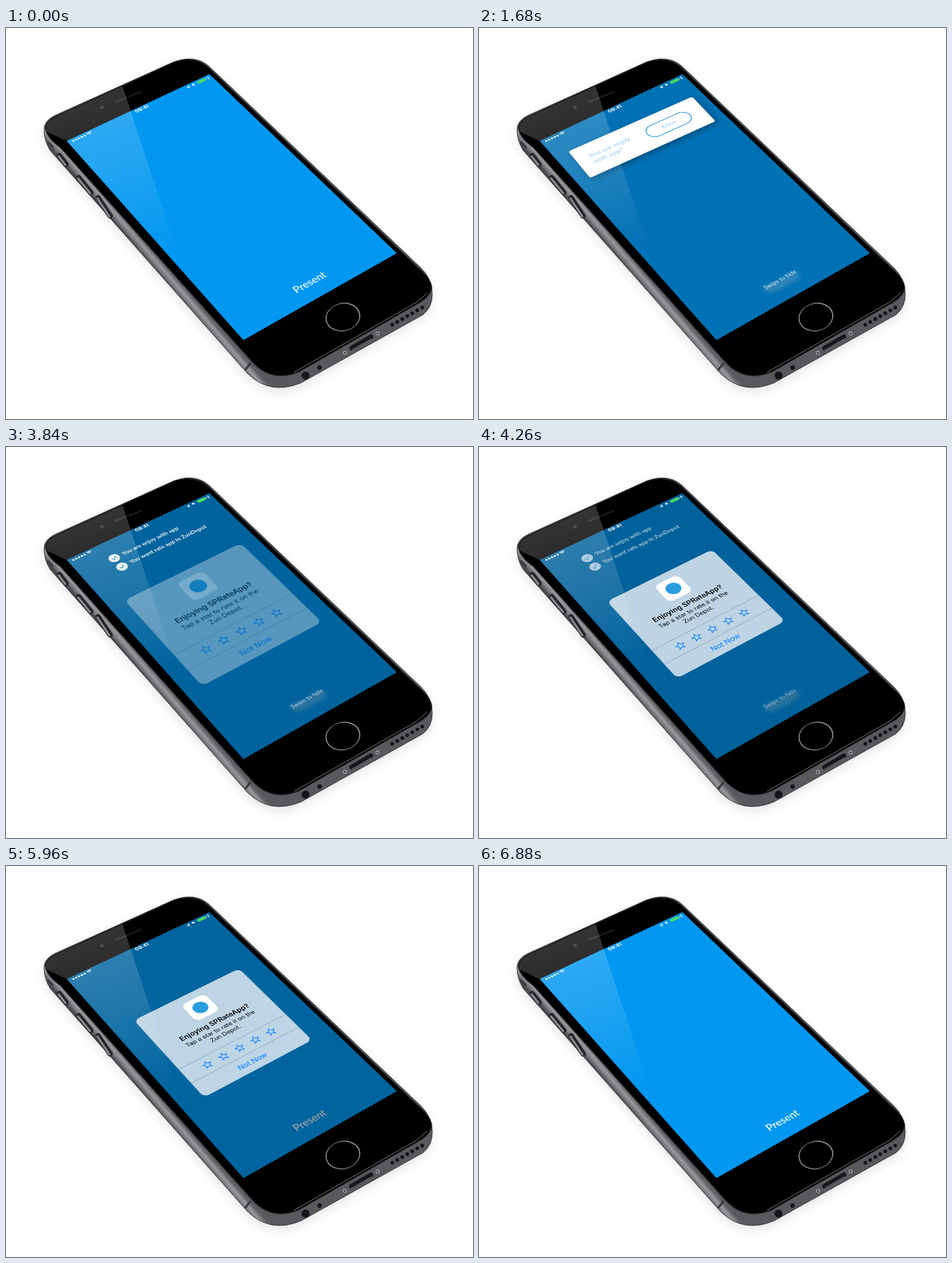
Animation of 700 by 585 pixels, one loop 6900 ms. Source, as an HTML page with a canvas:

```html
<!DOCTYPE html>
<html lang="en">
<head>
<meta charset="utf-8">
<title>Rate dialog</title>
<style>
  html, body { margin: 0; width: 100%; height: 100%; overflow: hidden; background: #fff; }
  canvas { position: absolute; left: 0; top: 0; display: block; }
  #screen { transform-origin: 0 0; }
</style>
</head>
<body>
<canvas id="phone" width="700" height="585"></canvas>
<canvas id="screen" width="375" height="667"></canvas>
<canvas id="glare" width="700" height="585"></canvas>
<script>
const LOOP = 6900, W = 375, H = 667, CX = W / 2;
const TEXT = 'Lato, sans-serif', SYSTEM = 'Inter, sans-serif';
const BLUE = '#1690dc', SKY = '#0097f1';
const context = id => document.getElementById(id).getContext('2d');
const body = context('phone'), screen2d = context('screen'), gloss = context('glare');
let ctx = screen2d;

// ---- timing ----
const clamp = x => Math.min(1, Math.max(0, x));
const smooth = x => x * x * (3 - 2 * x);
const ease = (t, from, to) => smooth(clamp((t - from) / (to - from)));
const easeOut = (t, from, to) => 1 - Math.pow(1 - clamp((t - from) / (to - from)), 3);
const mix = (a, b, k) => a + (b - a) * k;
const pulse = (t, inA, inB, outA, outB) => ease(t, inA, inB) * (1 - ease(t, outA, outB));

function track(t, keys) {
  let value = keys[0][1];
  for (let i = 1; i < keys.length; i++) {
    value = mix(value, keys[i][1], ease(t, keys[i - 1][0], keys[i][0]));
  }
  return value;
}

// ---- drawing helpers ----
function label(str, x, y, size, weight, color, align = 'center', family = TEXT) {
  ctx.font = `${weight} ${size}px ${family}`;
  ctx.textAlign = align;
  ctx.textBaseline = 'middle';
  ctx.fillStyle = color;
  ctx.fillText(str, x, y);
}

function box(x, y, w, h, r) {
  ctx.beginPath();
  ctx.roundRect(x, y, w, h, r);
}

function disc(c, x, y, r, color) {
  c.fillStyle = color;
  c.beginPath();
  c.arc(x, y, r, 0, Math.PI * 2);
  c.fill();
}

function line(c, color, width, ...points) {
  c.strokeStyle = color;
  c.lineWidth = width;
  c.beginPath();
  points.forEach(([x, y]) => c.lineTo(x, y));
  c.stroke();
}

function gradient(c, x0, y0, x1, y1, ...stops) {
  const fill = c.createLinearGradient(x0, y0, x1, y1);
  stops.forEach(([at, color]) => fill.addColorStop(at, color));
  return fill;
}

function layer(alpha, draw) {
  if (alpha <= 0.002) return;
  ctx.save();
  ctx.globalAlpha = alpha;
  draw();
  ctx.restore();
}

// Maps the flat screen onto its four corners on the stage.
function placeScreen([x0, y0], [x1, y1], [x2, y2], [x3, y3]) {
  const ax = x1 - x2, bx = x3 - x2, sx = x0 - x1 + x2 - x3;
  const ay = y1 - y2, by = y3 - y2, sy = y0 - y1 + y2 - y3;
  const det = ax * by - bx * ay;
  const g = (sx * by - bx * sy) / det, h = (ax * sy - sx * ay) / det;
  const m = [
    (x1 - x0 + g * x1) / W, (y1 - y0 + g * y1) / W, 0, g / W,
    (x3 - x0 + h * x3) / H, (y3 - y0 + h * y3) / H, 0, h / H,
    0, 0, 1, 0, x0, y0, 0, 1
  ];
  screen2d.canvas.style.transform = `matrix3d(${m.map(n => n.toFixed(9)).join()})`;
}

// ---- phone ----
const OUTLINE = new Path2D('M57 152Q57 139 73 131L251 51Q283 39 304 57L621 358Q639 375 639 398Q639 418 625 429L442 531Q396 550 362 517L66 183Q57 168 57 152Z');
const FACE = new Path2D('M60 150Q61 139 77 132L252 52Q282 42 302 59L618 360Q637 377 637 388Q636 401 618 411L440 513Q398 531 369 498L82 178Q62 164 60 150Z');

function drawPhone() {
  const c = body;
  c.fillStyle = '#fff';
  c.fillRect(0, 0, 700, 585);

  c.save();
  c.shadowColor = 'rgba(0,0,0,.1)';
  c.shadowBlur = 16;
  c.shadowOffsetY = 6;
  c.fillStyle = gradient(c, 214, 350, 228, 338,
    [0, '#48494c'], [.25, '#77787b'], [.5, '#98999c'], [.8, '#626366'], [1, '#58595c']);
  c.fill(OUTLINE);
  c.restore();

  c.strokeStyle = '#353639';
  c.lineWidth = 1;
  c.stroke(OUTLINE);
  c.strokeStyle = '#1b1c1e';
  c.lineWidth = 3;
  c.stroke(FACE);
  c.fillStyle = '#000';
  c.fill(FACE);

  c.lineCap = 'round';
  line(c, '#77787b', 1, [432, 515], [616, 410], [632, 396]);
  for (const [x1, y1, x2, y2] of [[80, 191, 90, 204], [109, 224, 127, 246], [138, 254, 156, 281]]) {
    line(c, '#252629', 8, [x1, y1], [x2, y2]);
    line(c, '#8b8c8f', 3, [x1 - 1, y1 + 1], [x2 - 1, y2 + 1]);
  }
  line(c, '#36373a', 3, [366, 502], [359, 511]);
  line(c, '#37383b', 3, [63, 171], [70, 178]);

  line(c, '#161719', 7, [518, 479], [547, 462]);
  line(c, '#77787b', 1, [518, 482], [548, 465]);
  disc(c, 449, 520, 6, '#151619');
  disc(c, 470, 508, 3.4, '#151619');
  for (const [x, y] of [[508, 486], [557, 457]]) {
    disc(c, x, y, 3, '#a0a1a4');
    disc(c, x, y, 1.6, '#38393c');
  }
  for (let i = 0; i < 7; i++) disc(c, 579 + i * 7.5, 444 - i * 4.3, 2.8, '#131417');

  line(c, '#2f3032', 2.6, [165, 110], [202, 95]);
  line(c, '#090909', 1.6, [165, 109.5], [202, 94.5]);
  disc(c, 144, 119, 2.6, '#25262a');

  c.strokeStyle = gradient(c, 482, 450, 526, 414, [0, '#98989a'], [.5, '#454548'], [1, '#a5a5a7']);
  c.lineWidth = 1.7;
  c.beginPath();
  c.ellipse(505, 432.5, 25.5, 20.5, -.22, 0, Math.PI * 2);
  c.stroke();
}

function drawGlare() {
  const c = gloss;
  c.save();
  c.clip(FACE);
  c.fillStyle = gradient(c, 155, 105, 235, 340,
    [0, 'rgba(255,255,255,.2)'], [.45, 'rgba(255,255,255,.12)'], [1, 'rgba(255,255,255,0)']);
  c.beginPath();
  [[174, 85], [258, 340], [250, 346], [91, 169], [50, 150], [50, 120]].forEach(p => c.lineTo(...p));
  c.fill();
  c.restore();
}

// ---- app screen ----
function wallpaper() {
  ctx.fillStyle = SKY;
  ctx.fillRect(0, 0, W, H);
  const step = 30, reach = H * .577;
  const faint = 'rgba(255,255,255,.035)';
  for (let x = -reach; x < W + reach; x += step) {
    line(ctx, faint, 1, [x, 0], [x + reach, H]);
    line(ctx, faint, 1, [x, 0], [x - reach, H]);
  }
  for (let y = 0; y < H; y += step * .866) line(ctx, faint, 1, [0, y], [W, y]);
}

function statusBar() {
  const y = 8.5;
  for (let i = 0; i < 5; i++) disc(ctx, 12 + i * 7, y, 2.5, '#fff');
  ctx.lineCap = 'butt';
  for (const r of [2, 5, 8]) {
    ctx.strokeStyle = '#fff';
    ctx.lineWidth = 1.8;
    ctx.beginPath();
    ctx.arc(52, y + 4, r, -Math.PI * .75, -Math.PI * .25);
    ctx.stroke();
  }
  label('09:41', CX, y + .5, 12.5, 700, '#fff', 'center', SYSTEM);
  ctx.fillStyle = '#fff';
  ctx.beginPath();
  [[306, 10], [316, 4], [312, 15], [311, 10]].forEach(p => ctx.lineTo(...p));
  ctx.fill();
  disc(ctx, 325, y, 3, '#fff');
  ctx.fillStyle = '#4cd964';
  box(336, 4.5, 22, 9, 2);
  ctx.fill();
  ctx.fillStyle = '#fff';
  ctx.fillRect(359, 7, 1.5, 4);
  line(ctx, '#fff', 1.6, [367, 4], [364, 9], [367, 9], [364, 14]);
}

// The button behind the dialog stays in place and melts into its blur.
function presentButton(t) {
  const blur = 7 * pulse(t, 20, 1100, 4200, 4980);
  ctx.save();
  if (blur > .1) ctx.filter = `blur(${blur}px)`;
  label('Present', CX, 627, 22.5, 500, '#fff');
  ctx.restore();
}

function cardText(lines, action, alpha) {
  layer(ctx.globalAlpha * alpha, () => {
    lines.forEach((str, i) => label(str, -129, -9 + i * 20, 17, 700, BLUE, 'left'));
    label(action, 67, 0, 14.5, 700, BLUE);
  });
}

function card(t) {
  const alpha = pulse(t, 120, 480, 3300, 3650);
  layer(alpha, () => {
    const moved = ease(t, 1620, 2120);
    const y = mix(-70, 117, easeOut(t, 100, 700)) + 25 * moved;
    const size = 1 - .08 * ease(t, 3300, 3650);
    ctx.translate(190, y);
    ctx.rotate(.037);
    ctx.scale(size, size);
    ctx.save();
    ctx.shadowColor = 'rgba(0,0,0,.32)';
    ctx.shadowBlur = 18;
    ctx.shadowOffsetX = 3;
    ctx.shadowOffsetY = 8;
    ctx.fillStyle = '#fff';
    box(-158, -48, 316, 96, 5);
    ctx.fill();
    ctx.restore();
    ctx.strokeStyle = '#2c97d6';
    ctx.lineWidth = 2;
    box(12, -19.5, 110, 39, 19.5);
    ctx.stroke();
    cardText(['You are enjoy', 'with app?'], 'Enjoy', 1 - ease(t, 1540, 1780));
    cardText(['Rate App in', 'ZunDepot?'], 'Rate', ease(t, 1760, 2050));
  });
}

function doneRow(str, y, alpha) {
  layer(alpha, () => {
    disc(ctx, 87, y, 12.5, '#fff');
    line(ctx, '#0872b4', 2, [81.5, y], [85.5, y + 4], [92.5, y - 4]);
    label(str, 108, y, 14.3, 700, '#fff', 'left');
  });
}

function star(x, y, r) {
  ctx.beginPath();
  for (let i = 0; i < 10; i++) {
    const a = -Math.PI / 2 + i * Math.PI / 5, d = i % 2 ? r * .45 : r;
    ctx.lineTo(x + d * Math.cos(a), y + d * Math.sin(a));
  }
  ctx.closePath();
  ctx.stroke();
}

function drawAlert() {
  const left = CX - 135;
  ctx.fillStyle = 'rgba(248,248,250,.77)';
  box(left, 192, 270, 264, 13);
  ctx.fill();
  ctx.fillStyle = '#fff';
  box(CX - 30, 212, 60, 60, 13);
  ctx.fill();
  disc(ctx, CX, 242, 17, '#2a9de0');

  const write = (str, y, size, weight, color) => label(str, CX, y, size, weight, color, 'center', SYSTEM);
  write('Enjoying SPRateApp?', 297, 16.8, 600, '#050608');
  write('Tap a star to rate it on the', 318.5, 14.3, 400, '#050608');
  write('Zun Depot.', 337, 14.3, 400, '#050608');
  write('Not Now', 433.5, 17, 400, '#007aff');

  for (const y of [364, 410]) line(ctx, 'rgba(40,75,105,.45)', 1, [left, y], [left + 270, y]);
  ctx.strokeStyle = '#007aff';
  ctx.lineWidth = 1.5;
  for (let i = -2; i <= 2; i++) star(CX + i * 40, 387, 10);
}

// Renders once off screen, so that the alert fades as one piece.
function renderAlert() {
  const sheet = document.createElement('canvas');
  sheet.width = W;
  sheet.height = H;
  ctx = sheet.getContext('2d');
  drawAlert();
  ctx = screen2d;
  return sheet;
}

function alertBox(t) {
  const shown = ease(t, 3690, 4010), scale = 1.2 - .2 * shown;
  layer(shown * (1 - ease(t, 6100, 6480)), () => {
    ctx.translate(CX, 324);
    ctx.scale(scale, scale);
    ctx.drawImage(alertSheet, -CX, -324);
  });
}

function drawScreen(t) {
  wallpaper();
  presentButton(t);

  const dim = track(t, [[20, 0], [600, .19], [1180, .25], [3300, .25], [3900, .35], [4600, .365], [5900, .34], [6080, .34], [6740, 0]]);
  ctx.fillStyle = `rgba(0,0,0,${dim})`;
  ctx.fillRect(0, 0, W, H);

  const leaving = 1 - ease(t, 4050, 4650);
  const muted = 1 - .12 * ease(t, 3650, 3900);
  layer(ease(t, 780, 1160) * leaving * muted * .85,
    () => label('Swipe to hide', CX, 618, 12.8, 400, '#fff'));
  doneRow('You are enjoy with app', 55.5, ease(t, 1700, 2150) * leaving * muted);
  doneRow('You want rate app in ZunDepot', 88, ease(t, 3400, 3800) * leaving * muted);
  card(t);
  alertBox(t);
  statusBar();
}

function frame() {
  drawScreen(performance.now() % LOOP);
  requestAnimationFrame(frame);
}

const alertSheet = renderAlert();
placeScreen([91, 169], [305, 69], [586, 337], [356, 467]);
drawPhone();
drawGlare();
frame();
</script>
</body>
</html>
```
